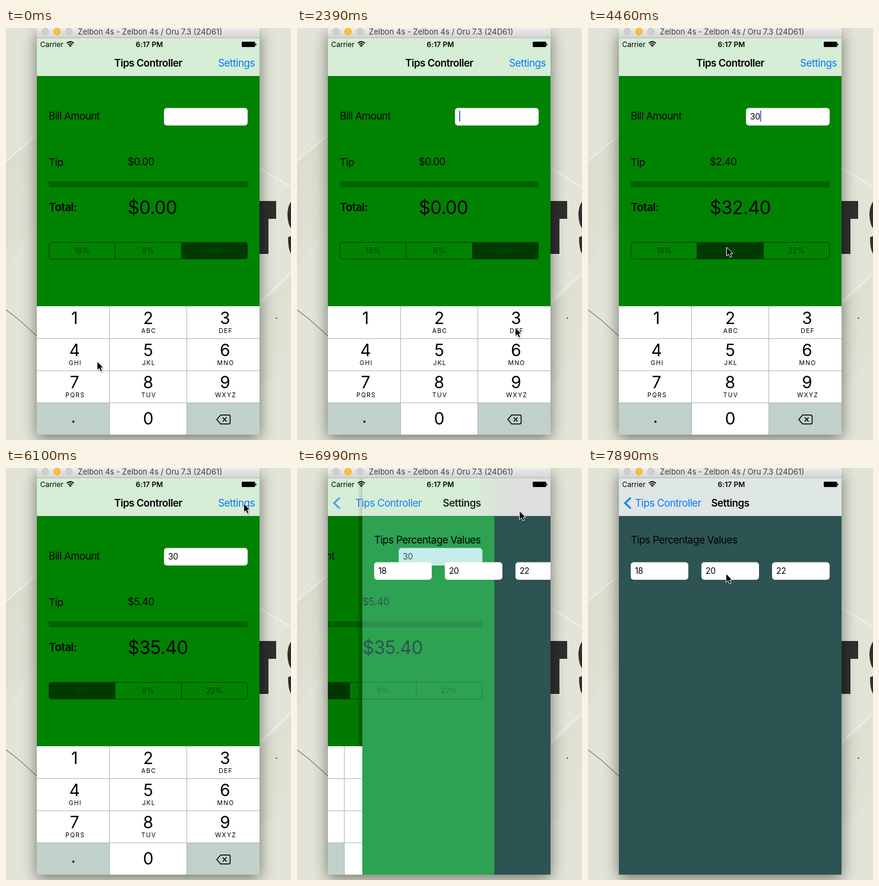
An HTML page that plays this animation: 480x693 px, repeating every 8000 ms.

```html
<!DOCTYPE html>
<html lang="en">
<head>
<meta charset="utf-8">
<title>Tip calculator demo</title>
<style>
html, body { margin: 0; width: 100%; height: 100%; overflow: hidden; background: #e2e4d7; }
svg { display: block; width: 100%; height: 100%; }
text { font: 17px Inter, Roboto, sans-serif; letter-spacing: -.027em; white-space: pre; }
.bold { font-weight: 600; }
.mid { text-anchor: middle; }
.blue { fill: #007aff; }
.entry { font-size: 14px; }
.seg { font-size: 13px; letter-spacing: 0; text-anchor: middle; }
.digit { font-size: 28px; letter-spacing: 0; text-anchor: middle; }
.abc { font-size: 10.5px; letter-spacing: 1.2px; text-anchor: middle; }
</style>
</head>
<body>
<svg viewBox="0 0 480 693" xmlns="http://www.w3.org/2000/svg">
  <defs>
    <linearGradient id="chrome" x2="0" y2="1"><stop stop-color="#ececec"/><stop offset="1" stop-color="#d3d3d3"/></linearGradient>
    <linearGradient id="edge"><stop stop-opacity="0"/><stop offset="1" stop-opacity=".35"/></linearGradient>
    <linearGradient id="mist"><stop stop-color="#dedede" stop-opacity="0"/><stop offset="1" stop-color="#dedede"/></linearGradient>
    <linearGradient id="fold" x2="1" y2="1"><stop stop-color="#d2d4c5"/><stop offset="1" stop-color="#e2e4d7"/></linearGradient>
    <filter id="blur" x="-20%" y="-20%" width="140%" height="140%"><feGaussianBlur stdDeviation="13"/></filter>
    <filter id="soft" x="-50%" y="-50%" width="200%" height="200%"><feGaussianBlur stdDeviation="1"/></filter>
    <clipPath id="screen"><rect x="52" y="17" width="375" height="667"/></clipPath>
    <clipPath id="padClip"><rect id="padRect" x="52" y="468" width="375" height="216"/></clipPath>
  </defs>

  <!-- paper wallpaper -->
  <rect width="480" height="693" fill="#e2e4d7"/>
  <path d="M0 224L52 180V330L0 400Z" fill="url(#fold)" opacity=".55"/>
  <path d="M0 224L52 180M427 462L480 412M427 235L480 268" stroke="#f0f1e8" stroke-width="2"/>
  <path d="M427 468L480 418V560L427 600Z" fill="url(#fold)" opacity=".5"/>
  <path d="M0 474L22 491L52 518" fill="none" stroke="#4b4b44"/>
  <circle cx="455.500" cy="488" r="1.200" fill="#44443f"/>
  <path d="M420 291H455V321H442V380H420Z" fill="#2f2f2f"/>
  <path d="M480 292Q474 300 474 315Q475 331 480 337ZM475 352L480 350V380Q475 372 475 352Z" fill="#2f2f2f"/>

  <!-- window -->
  <rect x="52" y="10" width="375" height="680" opacity=".5" filter="url(#blur)"/>
  <rect x="52" width="375" height="17" fill="url(#chrome)"/>
  <rect x="52" y="16" width="375" height="1" fill="#b5b5b5"/>
  <g stroke-width=".8">
    <circle cx="66" cy="6" r="5.700" fill="#d0d0d0" stroke="#bcbcbc"/>
    <circle cx="86" cy="6" r="5.700" fill="#fdbe2e" stroke="#e0a128"/>
    <circle cx="106" cy="6" r="5.700" fill="#d0d0d0" stroke="#bcbcbc"/>
  </g>
  <text x="121" y="11" fill="#3d3d3d" style="font-size:13px;letter-spacing:0">Zelbon 4s - Zelbon 4s / Oru 7.3 (24D61)</text>

  <g clip-path="url(#screen)">
    <rect x="52" y="17" width="375" height="667"/>
    <g id="calc">
      <rect x="52" y="17" width="375" height="667" fill="#008300"/>
      <text x="72" y="154">Bill Amount</text>
      <rect x="266" y="134.500" width="141" height="29.500" rx="5" fill="#fff"/>
      <text id="bill" class="entry" x="273" y="154"></text>
      <rect id="caret" y="139" width="2" height="18.500" fill="#4a6ee6"/>
      <text x="72" y="232">Tip</text>
      <text id="tip" x="205" y="231"></text>
      <rect x="72" y="258" width="335" height="10" fill="#006400"/>
      <text class="bold" x="72" y="308" style="font-size:18.500px">Total:</text>
      <text id="total" x="205" y="313" style="font-size:31px;letter-spacing:-.02em"></text>
      <g id="segments"></g>
      <rect x="72.500" y="360.500" width="334" height="28" rx="4" fill="none" stroke="#003a00"/>
      <path d="M183.500 360V389M295.500 360V389" stroke="#003a00"/>
      <rect id="dim" x="52" y="17" width="375" height="667"/>
    </g>
    <g id="settings">
      <rect x="52" y="17" width="375" height="667" fill="#7ae3de" fill-opacity=".37"/>
      <rect id="edgeShade" x="43" y="17" width="9" height="667" fill="url(#edge)"/>
      <text x="72" y="127">Tips Percentage Values</text>
      <g id="presets"></g>
    </g>
    <g clip-path="url(#padClip)"><g id="pad"></g></g>

    <!-- navigation bar -->
    <rect id="bar" x="52" y="17" width="375" height="64" fill="#d6edd6"/>
    <g id="haze">
      <rect y="17" width="60" height="64" fill="url(#mist)"/>
      <rect x="60" y="17" width="400" height="64" fill="#dedede"/>
    </g>
    <rect id="barShade" x="43" y="17" width="9" height="64" fill="url(#edge)"/>
    <rect x="52" y="80.500" width="375" height="1" fill-opacity=".32"/>
    <text id="title" class="bold mid" y="65">Tips Controller</text>
    <text id="back" class="blue mid" y="65">Tips Controller</text>
    <path id="chevron" d="M72 50L62.500 59L72 68" fill="none" stroke="#007aff" stroke-width="3"/>
    <text id="button" class="blue" x="419" y="65" text-anchor="end">Settings</text>
    <text id="heading" class="bold mid" y="65">Settings</text>

    <!-- status bar -->
    <text x="57.500" y="31.500" style="font-size:12px;letter-spacing:0">Carrier</text>
    <g fill="none" stroke="#000" stroke-width="1.700">
      <path d="M102.500 25.500Q108.300 20.500 114.100 25.500M104.600 28Q108.300 24.800 112 28"/>
    </g>
    <path d="M106 29.500Q108.300 27.500 110.600 29.500L108.300 32Z"/>
    <text class="bold mid" x="241.500" y="31.500" style="font-size:12px;letter-spacing:.1px">6:17 PM</text>
    <rect x="397" y="23" width="22.500" height="9" rx="1.500"/>
    <rect x="420" y="26" width="1.500" height="3.500" rx=".7"/>
  </g>

  <g id="cursor">
    <path d="M1 2V17L4.500 14L7 20L10 19L7.500 13H12Z" opacity=".35" filter="url(#soft)"/>
    <path d="M.5 .8V15.600L3.900 12.400L6.300 17.800L9 16.600L6.700 11.400H11Z" fill="#000" stroke="#fff" stroke-width="1"/>
  </g>
</svg>

<script>
const LOOP = 8000;
const SLIDE = { start: 6690, time: 550, cleared: 7330 };
const $ = id => document.getElementById(id);
const set = (id, attrs) => {
  for (const k in attrs) $(id).setAttribute(k, attrs[k]);
};
const clamp = v => Math.max(0, Math.min(1, v));
const between = (t, a, b) => t >= a && t < b;

// Pointer stops: time, x, y
const stops = [
  [0, 153, 560], [150, 153, 560], [450, 121, 574], [1050, 229, 607], [1500, 241, 583],
  [1790, 241, 583], [2390, 367, 503], [2540, 367, 503], [2690, 353, 520], [3150, 236, 652],
  [3340, 236, 652], [3870, 236, 379], [4200, 233, 368], [4550, 233, 368], [4850, 130, 372],
  [4950, 130, 372], [5060, 158, 357], [6050, 400, 59], [6880, 400, 59], [7290, 257, 128],
  [7740, 225, 168], [7890, 232, 177], [LOOP, 232, 177]
];
const presses = { 3: [2500, 2640], 0: [3200, 3340] };
const rates = [18, 8, 22];

function buildPad() {
  const x = [52, 174.5, 304.5, 427], mid = [115.5, 239.5, 369];
  const letters = ["", "ABC", "DEF", "GHI", "JKL", "MNO", "PQRS", "TUV", "WXYZ"];
  let out = "";
  const cell = (c, r, key, fill) =>
    `<rect id="key${key}" x="${x[c]}" y="${468 + r * 54}" width="${x[c + 1] - x[c]}" height="54.500" fill="${fill}"/>`;
  letters.forEach((abc, i) => {
    const c = i % 3, r = Math.floor(i / 3), y = 498 + r * 54;
    out += cell(c, r, i + 1, "#fff") +
      `<text class="digit" x="${mid[c]}" y="${y}">${i + 1}</text>` +
      `<text class="abc" x="${mid[c] + 1}" y="${y + 15}">${abc}</text>`;
  });
  out += cell(0, 3, "Dot", "#c0d1ca") + cell(1, 3, 0, "#fff") + cell(2, 3, "Del", "#c0d1ca") +
    `<text class="digit" x="113.500" y="664">.</text><text class="digit" x="239.500" y="667">0</text>
     <path d="M355 658.500L361.500 651H375Q377.500 651 377.500 653.500V663.500Q377.500 666 375 666H361.500ZM365 655L371.500 662M371.500 655L365 662"
       fill="none" stroke="#000" stroke-width="1.500" stroke-linejoin="round"/>
     <path d="M174.500 468V684M304.500 468V684M52 522.500H427M52 576.500H427M52 630.500H427" stroke="#b2b5b3"/>`;
  $("pad").innerHTML = out;
}

function buildForms() {
  const x = [72.5, 183.5, 295.5, 406.5];
  $("segments").innerHTML = rates.map((rate, i) =>
    `<rect id="seg${i}" x="${x[i]}" y="360.500" width="${x[i + 1] - x[i]}" height="28" rx="${i === 1 ? 0 : 3}" fill="#003a00"/>` +
    `<text id="rate${i}" class="seg" x="${(x[i] + x[i + 1]) / 2}" y="379">${rate}%</text>`).join("");
  $("presets").innerHTML = [18, 20, 22].map((n, i) =>
    `<rect x="${72 + i * 119}" y="158.500" width="97" height="29.500" rx="5" fill="#fff"/>` +
    `<text class="entry" x="${79 + i * 119}" y="178">${n}</text>`).join("");
}

// Standard "ease" curve, solved by bisection
function ease(u) {
  if (u <= 0 || u >= 1) return clamp(u);
  let lo = 0, hi = 1, s = .5;
  for (let i = 0; i < 24; i++) {
    s = (lo + hi) / 2;
    if (.75 * s * (1 - s) + s ** 3 < u) lo = s; else hi = s;
  }
  return .3 * s * (1 - s) ** 2 + 3 * s * s * (1 - s) + s ** 3;
}

function pointer(t) {
  const i = Math.max(1, stops.findIndex(s => s[0] > t));
  const [t0, x0, y0] = stops[i - 1], [t1, x1, y1] = stops[i];
  const u = (t - t0) / (t1 - t0), k = u * u * (3 - 2 * u);
  return [x0 + (x1 - x0) * k, y0 + (y1 - y0) * k];
}

function drawForm(t) {
  const bill = t < 2600 ? "" : t < 3300 ? "3" : "30";
  const chosen = t < 4100 ? 2 : t < 4930 ? 1 : 0;
  const tip = bill * rates[chosen] / 100;
  $("bill").textContent = bill;
  $("tip").textContent = "$" + tip.toFixed(2);
  $("total").textContent = "$" + (+bill + tip).toFixed(2);
  const blink = between(t % 1000, 300, 800) && t < SLIDE.start;
  const width = bill ? $("bill").getComputedTextLength() : 0;
  set("caret", { x: 273 + width, opacity: blink ? 1 : 0 });
  rates.forEach((_, i) => {
    set("seg" + i, { opacity: i === chosen ? 1 : 0 });
    set("rate" + i, { fill: i === chosen ? "#005000" : "#003e00" });
  });
  for (const key in presses)
    set("key" + key, { fill: between(t, ...presses[key]) ? "#c0d1ca" : "#fff" });
}

function drawSlide(t) {
  const p = ease((t - SLIDE.start) / SLIDE.time);
  const done = t >= SLIDE.cleared;
  const shift = `translate(${-112 * p} 0)`, enter = 375 * (1 - p);
  const moving = p > 0 && p < 1 ? 1 : 0;
  set("calc", { transform: shift, opacity: done ? 0 : 1 });
  set("dim", { opacity: .07 * p });
  set("pad", { transform: shift });
  set("padRect", { width: enter });
  set("settings", { transform: `translate(${enter} 0)`, opacity: p > 0 ? 1 : 0 });
  set("edgeShade", { opacity: moving });
  set("barShade", { transform: `translate(${enter} 0)`, opacity: moving * .4 });

  set("bar", { fill: done ? "#dfe6e6" : "#d6edd6" });
  set("haze", { transform: `translate(${392 - 112 * p} 0)`, opacity: done ? 0 : clamp(p * 1.5) });
  const x = 239.5 - 104.5 * p ** 1.2;
  set("title", { x, opacity: clamp(1 - p * 1.5) });
  set("back", { x, opacity: p * p * (3 - 2 * p) * .9 + .1 * p });
  set("chevron", { opacity: p ** 2.4 });
  set("button", { opacity: clamp(1 - p * 1.8) });
  set("heading", { x: 239.5 + 247 * (1 - p), opacity: p });
}

function draw(t) {
  drawForm(t);
  drawSlide(t);
  set("cursor", { transform: `translate(${pointer(t)})` });
}

function tick() {
  draw(performance.now() % LOOP);
  requestAnimationFrame(tick);
}

buildPad();
buildForms();
tick();
</script>
</body>
</html>
```
